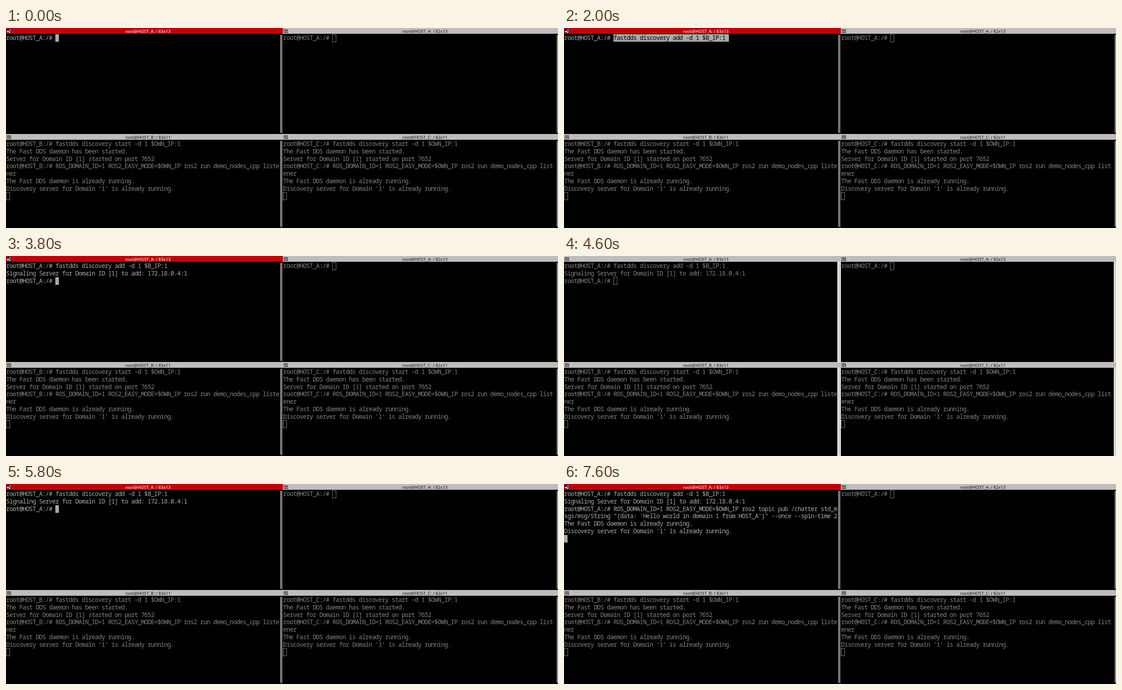
Recreate the animation shown at these times as an HTML page with a canvas. Size 1242x451 px, loop 8000 ms.

```html
<!DOCTYPE html>
<html>
<head>
<meta charset="utf-8">
<title>Terminal panes</title>
<style>
  html, body { margin: 0; width: 100%; height: 100%; overflow: hidden; background: #000; }
  canvas { display: block; }
</style>
</head>
<body>
<canvas id="stage" width="1242" height="451"></canvas>
<script>
const ctx = document.getElementById('stage').getContext('2d');
const LOOP = 8000, CELL = 7.4, ROW = 16.83;
const MONO = '13.8px "Noto Sans Mono", monospace';
const TITLE = '9.7px "Noto Sans", "Open Sans", sans-serif';
const BRIGHT = '#aaaaa6', DIM = '#82827f', BAR = '#bfbdbb', RED = '#c00309';

const PROMPT = 'root@HOST_A:/# ';
const ADD = 'fastdds discovery add -d 1 $B_IP:1';
const PUB = [
  'ROS_DOMAIN_ID=1 ROS2_EASY_MODE=$OWN_IP ros2 topic pub /chatter std_m',
  `sgs/msg/String "{data: 'Hello world in domain 1 from HOST_A'}" --once --spin-time 2`
];
const RUNNING = [
  'The Fast DDS daemon is already running.',
  "Discovery server for Domain '1' is already running."
];

function rect(x, y, w, h, color) {
  ctx.fillStyle = color;
  ctx.fillRect(x, y, w, h);
}

function bar(x, y, w, h, color) {
  ctx.fillStyle = color;
  ctx.beginPath();
  ctx.roundRect(x, y, w, h, w / 2);
  ctx.fill();
}

// Text on the character grid of a pane; selected text is inverted.
function print(pane, row, col, text, color, selected) {
  const x = pane.x + col * CELL, y = pane.y + 14 + row * ROW;
  if (selected) rect(x, y, text.length * CELL, ROW, color);
  ctx.font = MONO;
  ctx.letterSpacing = '0px';
  ctx.letterSpacing = CELL - ctx.measureText('0').width + 'px';
  ctx.textAlign = 'left';
  ctx.fillStyle = selected ? '#000' : color;
  ctx.fillText(text, x, y + 13);
}

function cursor(pane, row, col, solid) {
  const x = pane.x + col * CELL, y = pane.y + 14 + row * ROW;
  if (solid) return rect(Math.round(x), Math.round(y), 8, 17, BRIGHT);
  ctx.strokeStyle = DIM;
  ctx.lineWidth = 1;
  ctx.strokeRect(Math.floor(x) + .5, Math.floor(y) + .5, 8, 17);
}

function groupIcon(x, y, active) {
  if (active) {
    rect(x + 2, y + 2, 10, 10, '#35070b');
    rect(x + 7, y + 3, 4, 4, '#3aa0e0');
    rect(x + 3, y + 6, 3, 4, '#eee');
    rect(x + 7, y + 8, 3, 3, '#eee');
    return;
  }
  ctx.strokeStyle = '#222';
  ctx.lineWidth = 1;
  ctx.strokeRect(x + 2.5, y + 3.5, 8, 7);
  rect(x + 6, y + 3, 1, 8, '#222');
  rect(x + 2, y + 6, 9, 1, '#222');
  rect(x + 8, y + 8, 4, 4, BAR);
  rect(x + 8, y + 9, 4, 1, '#222');
  rect(x + 9, y + 10, 2, 1, '#222');
}

function frame(pane, active, focused) {
  const { left, y, width, height, scroll } = pane, right = left + width;
  rect(left, y, width, 13, active ? RED : BAR);
  groupIcon(left, y, active);
  if (!active) rect(left + 16, y + 1, 1, 12, '#cfcdcb');
  ctx.font = TITLE;
  ctx.letterSpacing = '0px';
  ctx.textAlign = 'center';
  ctx.fillStyle = active ? '#fff' : '#111';
  ctx.fillText(`root@HOST_${pane.host}: / ${pane.size}`, pane.center, y + 10.5);

  if (!focused) rect(scroll - 2, y + 13, right - scroll + 2, height - 13, '#e6e6e4');
  bar(scroll, y + 15, 4, height - 17, focused ? '#858583' : '#cececc');
}

const column = (x, left, width, center, scroll) => ({ x, left, width, center, scroll });
const L = column(.3, 0, 623, 319.3, 617), R = column(623.6, 623, 619, 942.5, 1239);
const paneA = { ...L, y: 0, height: 239, host: 'A', size: '83x13' };
const paneA2 = { ...R, y: 0, height: 239, host: 'A', size: '82x13' };
const paneB = { ...L, y: 239, height: 212, host: 'B', size: '83x11' };
const paneC = { ...R, y: 239, height: 212, host: 'C', size: '82x11' };

function listener(pane, cols) {
  const prompt = `root@HOST_${pane.host}:/# `;
  const command = prompt + 'ROS_DOMAIN_ID=1 ROS2_EASY_MODE=$OWN_IP ros2 run demo_nodes_cpp listener';
  [
    prompt + 'fastdds discovery start -d 1 $OWN_IP:1',
    'The Fast DDS daemon has been started.',
    'Server for Domain ID [1] started on port 7652',
    command.slice(0, cols),
    command.slice(cols),
    ...RUNNING
  ].forEach((line, row) => print(pane, row, 0, line, DIM));
  cursor(pane, 7, 0, false);
}

function session(t, focused) {
  const color = focused ? BRIGHT : DIM;
  const write = (row, col, text, selected) => print(paneA, row, col, text, color, selected);
  const start = PROMPT.length;
  let row = 0, col = start;

  write(0, 0, PROMPT);
  if (t >= 1600) {
    write(0, start, ADD, t < 2200);
    col += ADD.length;
  }
  if (t >= 2200) [row, col] = [1, 0];
  if (t >= 2600) {
    write(1, 0, 'Signaling Server for Domain ID [1] to add: 172.18.0.4:1');
    write(2, 0, PROMPT);
    [row, col] = [2, start];
  }
  if (t >= 6000) {
    PUB.forEach((line, i) => write(2 + i, i ? 0 : start, line, t < 6400));
    [row, col] = [4, 0];
  }
  if (t >= 6800) {
    RUNNING.forEach((line, i) => write(4 + i, 0, line));
    row = 6;
  }

  // The blink restarts with each key press.
  const hidden = [[400, 1000], [2800, 3400], [4000, 4200], [7000, 7600]]
    .some(([from, to]) => t >= from && t < to);
  if (!hidden) cursor(paneA, row, col, focused);
}

function draw(now) {
  const t = now % LOOP;
  const focused = t < 4200 || t >= 5200;
  rect(0, 0, 1242, 451, '#000');
  rect(622, 0, 1, 451, '#555');
  for (const pane of [paneA, paneA2, paneB, paneC]) frame(pane, focused && pane === paneA, focused);
  session(t, focused);
  print(paneA2, 0, 0, PROMPT, DIM);
  cursor(paneA2, 0, PROMPT.length, false);
  listener(paneB, 83);
  listener(paneC, 82);
  requestAnimationFrame(draw);
}
requestAnimationFrame(draw);
</script>
</body>
</html>
```
